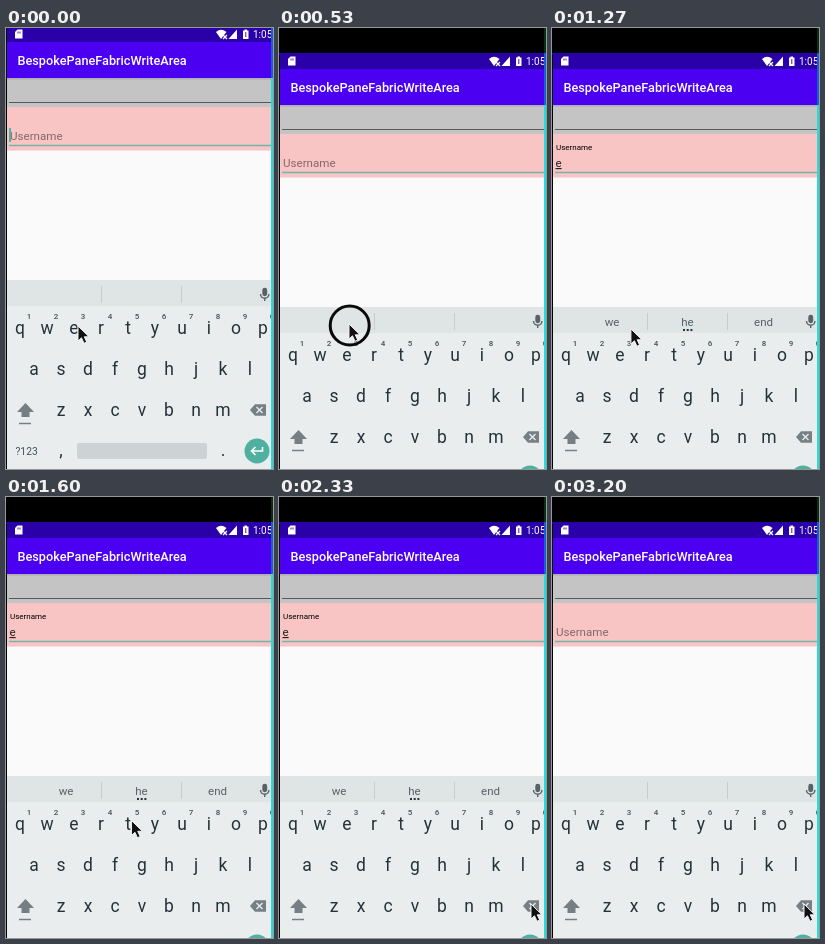
These frames come from a looping animation (267 by 441 pixels, 3270 ms). An HTML page:

```html
<!DOCTYPE html>
<html>
<head>
<meta charset="utf-8">
<style>
  html, body { margin: 0; width: 100%; height: 100%; overflow: hidden; background: #000; }
  svg { display: block; width: 267px; height: 441px; font-family: Roboto, "Noto Sans", sans-serif; }
  .mid { text-anchor: middle; }
  .key { font-size: 17.5px; fill: #263238; }
  .digit { font-size: 8px; fill: #455358; font-weight: 500; }
  .word { font-size: 11.5px; fill: #566368; }
  .icon { fill: #757f84; }
</style>
</head>
<body>
<svg viewBox="0 0 267 441">
  <rect width="267" height="441" fill="#000"/>
  <g id="screen">
    <rect width="267" height="441" fill="#fafafa"/>

    <rect y="50" width="267" height="29" fill="#c4c4c4"/>
    <rect y="50" width="267" height="1.5" fill="#adadb3"/>
    <path d="M3 74.5H265" stroke="#595959"/>
    <rect y="79" width="267" height="43.5" fill="#f9c4c4"/>
    <path d="M3 117.5H265" stroke="#70b5a9" stroke-width="1.5"/>

    <rect y="-2" width="267" height="16" fill="#2a00a8"/>
    <rect y="14" width="267" height="36" fill="#4b00f2"/>
    <text x="11.5" y="37" font-size="12.7" font-weight="500" fill="#fff">BespokePaneFabricWriteArea</text>
    <g fill="#fff">
      <path d="M11.5 1.5H16.5V10.5H9V4Z"/>
      <path d="M210 4Q215 -.5 220.5 4L215 11Z"/>
      <path d="M231 1.5V11H222.5Z"/>
      <path d="M238.5 1.5H241V2.5H242.5V11H237V2.5H238.5Z"/>
      <text x="247" y="10" font-size="10">1:05</text>
    </g>
    <path d="M217 7l4 4m0-4l-4 4" stroke="#fff" stroke-width="1.2"/>
    <path d="M12 3.5v2m2-2v2M239.8 4v5" stroke="#2a00a8" stroke-width=".9"/>

    <text id="label" x="4" font-size="8">Username</text>
    <text id="hint" x="4" y="112" font-size="11.6" fill="#85686a">Username</text>
    <text id="typed" x="3.5" y="112" font-size="11.6" fill="#222" text-decoration="underline">e</text>
    <rect id="caret" y="100" width="2" height="14" fill="#4eb3a2"/>

    <rect y="252" width="267" height="26" fill="#dfe4e4"/>
    <rect y="278" width="267" height="163" fill="#e9edee"/>
    <path d="M95.5 258V275M175.5 258V275" stroke="#c6cccd"/>
    <g stroke="#566368" fill="none" stroke-width="1.4">
      <rect x="257" y="260.5" width="3.5" height="7" rx="1.7" fill="#566368"/>
      <path d="M254.5 266a4.2 4.2 0 0 0 8.4 0M258.7 270v3"/>
    </g>
    <g id="words" class="word mid">
      <text x="60" y="271">we</text>
      <text x="135.5" y="271">he</text>
      <text x="211.5" y="271">end</text>
      <path d="M131 275h2m1.7 0h2m1.7 0h2" stroke="#263238" stroke-width="2"/>
    </g>
    <g id="keys" class="mid"></g>
    <path class="icon" d="M19.5 375L28 384H23.5V389H15.5V384H11Z"/>
    <path d="M13 395.5H25" stroke="#757f84" stroke-width="1.5"/>
    <path class="icon" d="M244 382L249 376.2H260V387.8H249Z"/>
    <path d="M250.5 379l6 6m0-6l-6 6" stroke="#e9edee" stroke-width="1.4"/>
    <text x="9.5" y="426.5" font-size="10.3" fill="#455358">?123</text>
    <rect x="71" y="415" width="130" height="16" rx="2" fill="#cdd2d4"/>
    <circle cx="251" cy="423" r="12.5" fill="#4fb0a0"/>
    <path d="M256.5 419v4H245.5m4-4l-4 4 4 4" fill="none" stroke="#fff" stroke-width="1.6"/>

    <g id="popup">
      <rect x="52" y="241" width="33.5" height="73" rx="2" fill="#979da0"/>
      <rect x="52.5" y="240" width="32" height="72.5" rx="2" fill="#c7cccf"/>
      <text class="mid" x="68.5" y="267.5" font-size="25" fill="#263238">e</text>
      <path d="M78 274.5h1.2m1 0h1.2m1 0h1.2" stroke="#59676d"/>
    </g>
    <rect width="1" height="441" fill="#000"/>
    <!-- Edge strip, tinted by what lies behind it -->
    <rect x="265" y="-30" width="2" height="28" fill="#06300f"/>
    <rect x="265" y="-2" width="2" height="52" fill="#1260d6"/>
    <rect x="265" y="50" width="2" height="391" fill="#20dfda"/>
  </g>
  <circle id="ring" r="19.5" fill="none" stroke="#0a0a0a" stroke-width="3"/>
  <path id="mouse" d="M0 0V15L3.5 11.8L6 17.3L8.7 16.1L6.3 10.8H11Z" fill="#111" stroke="#f4f4f4"/>
</svg>
<script>
const LOOP = 3270, STEPS = 49;
const PRESS = 590, TYPE = 660, ERASE = 2715;
const $ = id => document.getElementById(id);
const show = (id, on) => $(id).setAttribute('visibility', on ? 'visible' : 'hidden');
const move = (id, x, y) => $(id).setAttribute('transform', `translate(${x} ${y})`);
const clamp = v => Math.max(0, Math.min(1, v));
const ease = v => (1 - Math.cos(Math.PI * clamp(v))) / 2;

// Keyboard rows: letters, first centre, baseline
const rows = [['qwertyuiop', 14, 305.5], ['asdfghjkl', 28, 346.5], ['zxcvbnm', 55, 387.5]];
const keyText = (cls, x, y, s) => `<text class="${cls}" x="${x}" y="${y}">${s}</text>`;
let markup = keyText('key', 55, 428, ',') + keyText('key', 217, 428, '.');
rows.forEach(([letters, x0, y], row) => [...letters].forEach((c, i) => {
  markup += keyText('key', x0 + 27 * i, y, c);
  if (!row) markup += keyText('digit', 23 + 27 * i, 291, (i + 1) % 10);
}));
$('keys').innerHTML = markup;

// Pointer path: time, x, y
const path = [
  [0, 72, 298], [400, 70, 296], [1070, 70, 296], [1270, 79, 301], [1600, 125, 323],
  [1870, 199, 407], [2130, 244, 409], [2270, 252, 407], [LOOP, 252, 407]
];
function pointer(t) {
  const i = path.findIndex(p => p[0] > t);
  const [a, b] = [path[i - 1], path[i]];
  const k = (t - a[0]) / (b[0] - a[0]);
  return [1, 2].map(n => a[n] + (b[n] - a[n]) * k);
}

function draw(t) {
  const filled = t >= TYPE && t < ERASE;
  move('screen', 0, t < 520 ? 0 : 27);

  const rise = ease((t - TYPE - 37) / 300) - ease((t - ERASE) / 300);
  $('label').setAttribute('y', 108 - 13 * rise);
  $('label').setAttribute('opacity', rise);
  show('hint', !filled);
  show('typed', filled);

  const since = t - (t >= ERASE ? ERASE - 20 : filled ? TYPE : 0);
  $('caret').setAttribute('x', filled ? 9.5 : 3);
  show('caret', since % 1000 < 500);

  show('popup', t >= PRESS && t < 1110);
  show('words', t >= 930 && t < 2920);

  const [x, y] = pointer(t);
  move('mouse', x, y);
  move('ring', x + .7, y + 1.5);
  show('ring', (t >= 390 && t < 590) || (t >= 2390 && t < 2590));
}

const start = performance.now();
function tick() {
  const t = (performance.now() - start) % LOOP;
  draw(Math.floor(t * STEPS / LOOP + .1) % STEPS * LOOP / STEPS);
  requestAnimationFrame(tick);
}
tick();
</script>
</body>
</html>
```
